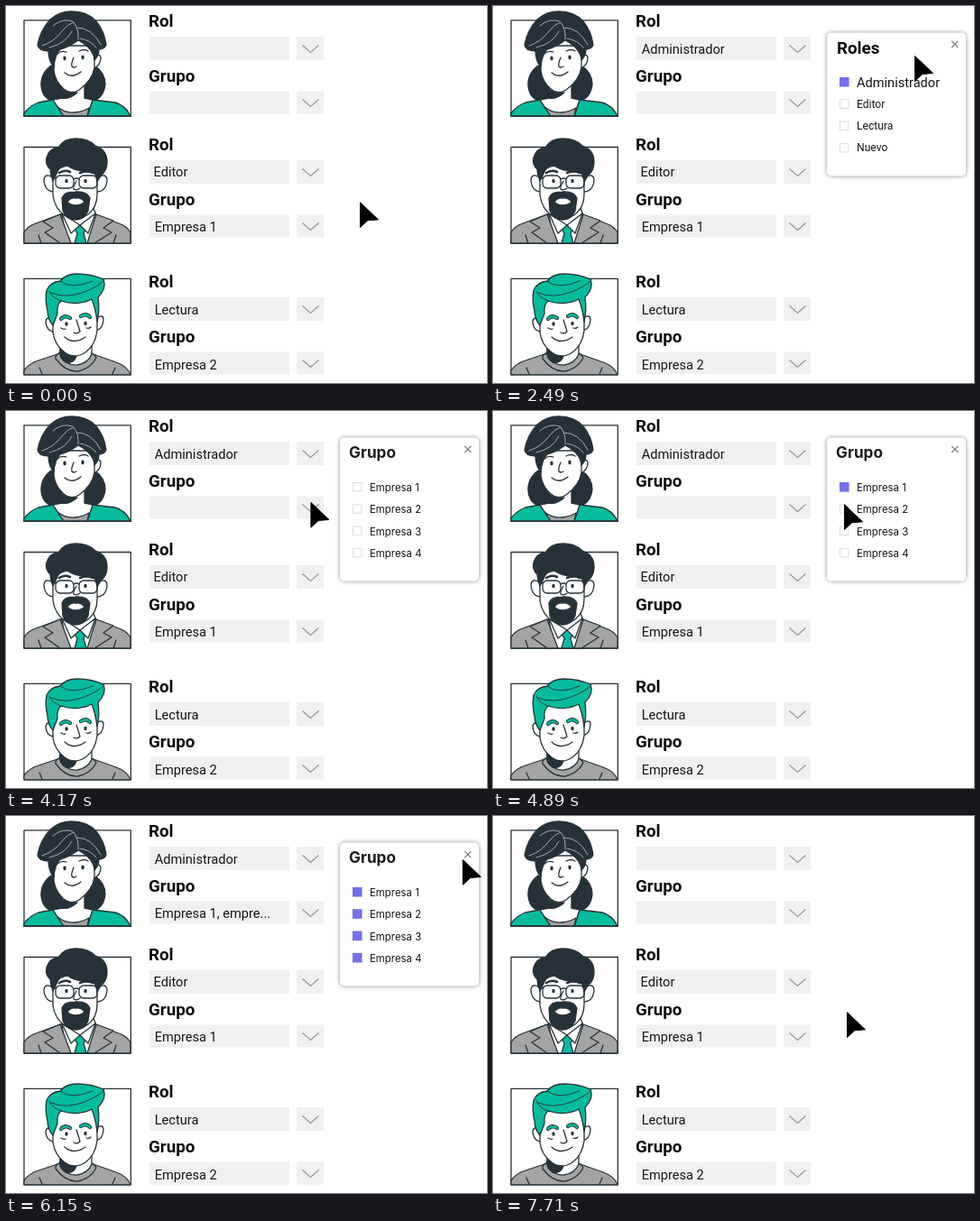
An HTML page for the animation above (8.19 s loop, 533x418 px).

```html
<!DOCTYPE html>
<html lang="es">
<head>
<meta charset="utf-8">
<title>Rol y grupo</title>
<style>
html, body { margin: 0; width: 100%; height: 100%; overflow: hidden; background: #fff; }
svg { display: block; }
text { font: 14.6px Roboto, sans-serif; fill: #151515; }
.b { font-size: 18.8px; font-weight: 700; fill: #0c0c0c; }
.s { font-size: 12.1px; }
.g { font: 11.4px Inter, sans-serif; }
.gb { font: 700 17.2px Inter, sans-serif; fill: #1c1c1c; }
.face { stroke: #263238; stroke-width: 1.3; stroke-linejoin: round; stroke-linecap: round; fill: #fff; }
.ink { fill: #263238; }
.teal { fill: #06bc9c; }
.grey { fill: #a4a4a4; }
.line { fill: none; }
.shine { fill: none; stroke: #c3cacd; stroke-width: .8; }
.dot { fill: #263238; stroke: none; }
.card { fill: #fff; filter: drop-shadow(0 0 2.5px rgba(0,0,0,.45)); }
</style>
</head>
<body>
<svg width="533" height="418" viewBox="0 0 533 418">
  <g class="face">
    <rect x="20" y="15.800" width="118.300" height="106.500"/>
    <path class="ink" d="M50 66Q38 75 39 89Q41 104 53 105Q60 105 62 98V70ZM98 66Q110 74 110 87Q108 102 97 105Q88 105 86 98V80Z"/>
    <path class="teal" d="M20 122V119Q27 110 36 107L52 104L64 122ZM138 122Q132 110 121 107L96 104L90 122Z"/>
    <path d="M62 88V102L52 104L64 122H90L96 104L87 102V88Z"/>
    <path class="grey" d="M57 112Q66 119 76 118Q86 117 92 113L90 122H64Z"/>
    <path class="ink" d="M62 92Q69 98 79 96Q70 104 62 102Z"/>
    <path d="M98 56Q104 52 105 57Q105 66 97 69"/>
    <path d="M53 44V72Q55 84 64 92Q72 99 81 93Q96 82 98 68V44Z"/>
    <path class="ink" d="M53 68Q47 60 47 50Q36 50 35 43Q38 27 49 15Q59 6 73 6Q90 6 100 17Q109 28 111 43Q109 48 103 48Q103 55 98 60Q97 47 80 38Q69 46 60 48Q54 54 53 68Z"/>
    <path class="shine" d="M40 44Q53 40 62 28Q68 20 75 18Q81 26 80 37M48 46Q66 42 73 28M79 24Q95 24 105 43M82 36Q94 38 100 46M52 22Q62 13 74 17"/>
    <path class="line" d="M57 53Q61 49 67 51M81 50Q87 47 91 50M75 57Q72 64 73 67Q75 69 78 67M65 74Q73 81 83 73"/>
    <ellipse class="dot" cx="65" cy="58" rx="1.7" ry="2.4"/><ellipse class="dot" cx="85" cy="57" rx="1.7" ry="2.4"/>
    <path class="line" d="M20 122.300H138"/>
  </g>

  <g class="face">
    <rect x="20" y="156.500" width="118.300" height="106.500"/>
    <path class="grey" d="M20 263V251Q24 244 33 241L60 231H99L125 241Q134 244 138 251V263Z"/>
    <path d="M62 222V232L68 263H95L100 232L96 222Z"/>
    <path class="grey" d="M60 231L41 239L52 246L43 251L60 263H72ZM100 231L119 238L108 246L117 251L98 263H90Z"/>
    <path class="teal" d="M75 246L82 243L89 246L86 252L89 263H76L79 252Z"/>
    <path d="M62 230L82 243L72 252ZM99 230L82 243L91 252Z"/>
    <path d="M53 191Q43 184 42 193Q43 206 54 206M101 191Q111 184 112 193Q111 206 100 206"/>
    <path d="M52 177V210Q54 225 66 233Q78 240 91 231Q101 223 101 209V177Z"/>
    <path class="ink" d="M52 194Q49 187 49 181Q43 176 45 168Q48 158 58 157Q64 147 77 147Q91 147 99 155Q112 159 112 173Q112 183 105 188L101 195Q100 186 95 183Q79 185 68 177Q58 178 56 186Z"/>
    <path class="ink" d="M62 213Q64 206 77 206Q90 205 93 213L91 227Q87 237 77 237Q67 237 63 227Z"/>
    <path d="M68 217Q72 212 77 213Q83 212 87 217Q84 221 77 221Q71 221 68 217Z"/>
    <path class="line" d="M59 185Q65 181 71 184M82 185Q90 182 96 185" stroke-width="2.6"/>
    <path class="line" d="M52 192L56 190M75 192Q78 190 81 192M100 190L103 191M78 194Q74 201 75 203Q78 205 82 202"/>
    <rect class="line" x="55" y="188" width="20" height="14" rx="5"/>
    <rect class="line" x="81" y="188" width="20" height="14" rx="5"/>
    <ellipse class="dot" cx="67" cy="194" rx="1.7" ry="2.2"/><ellipse class="dot" cx="88" cy="194" rx="1.7" ry="2.2"/>
    <path class="line" d="M36 254L39 263M122 254L119 263"/>
  </g>

  <g class="face">
    <rect x="20" y="302.300" width="118.300" height="106.500"/>
    <path class="grey" d="M20 408.800V404Q26 396 36 393L60 385H94L122 395Q134 399 138 408.800Z"/>
    <path d="M60 372V386Q66 399 79 398Q91 396 95 386V372Z"/>
    <path class="ink" d="M60 377Q67 387 78 388Q75 397 66 395Q60 391 60 386Z"/>
    <path class="line" d="M60 384Q54 387 55 391Q66 406 80 405Q94 402 100 390Q98 386 95 385"/>
    <path d="M53 348Q45 343 44 350Q45 361 54 361M100 346Q108 341 108 348Q107 359 99 360"/>
    <path d="M52 328V362Q54 376 65 384Q76 392 88 384Q99 376 101 360V324Z"/>
    <path class="teal" d="M52 354Q46 347 46 338Q43 326 45 315Q49 306 60 305Q66 297 79 297Q94 297 108 303Q112 313 102 323Q104 337 101 350Q99 335 95 325Q80 333 61 327Q56 331 57 341Z"/>
    <path class="line" d="M50 318Q66 325 87 317Q102 311 109 304M61 327Q50 323 48 316M60 305Q72 315 96 305" stroke-width=".9"/>
    <path class="line" d="M61 347Q65 342 71 346M83 344Q89 340 93 345" style="stroke:#263238;stroke-width:4.200"/>
    <path class="line" d="M61 347Q65 342 71 346M83 344Q89 340 93 345" style="stroke:#06bc9c;stroke-width:2.400"/>
    <path class="line" d="M78 348Q81 357 82 361Q79 364 75 362M65 367Q75 376 88 367M61 357Q64 359 66 358M89 357Q92 358 94 356"/>
    <ellipse class="dot" cx="67" cy="352.500" rx="1.7" ry="2.3"/><ellipse class="dot" cx="88" cy="352" rx="1.7" ry="2.3"/>
    <path class="line" d="M37 401L40 408M121 401L118 408"/>
  </g>

  <g id="form"></g>
  <text x="163.500" y="189">Editor</text>
  <text x="164.700" y="250">Empresa 1</text>
  <text x="164.700" y="342">Lectura</text>
  <text x="164.700" y="403">Empresa 2</text>
  <text id="role" x="164.700" y="53">Administrador</text>
  <text id="group" x="164.700" y="113">Empresa 1, empre...</text>
  <g id="roles"></g>
  <g id="groups"></g>
  <path id="cursor" d="M.5 .8V28.500L8.800 20.800L20.500 19.800Z" stroke="#000" stroke-linejoin="round"/>
</svg>
<script>
const LOOP = 8190, STEP = 30;
const $ = id => document.getElementById(id);

const field = (label, base, y, h) => `<text class="b" x="158" y="${base}">${label}</text>
  <path fill="#f0f0f0" d="M159 ${y}h155v${h}h-155zM322 ${y}h30v${h}h-30z"/>
  <path fill="none" stroke="#999" stroke-width="1.3" d="M328.500 ${y + h / 2 - 3.5}l9 8l9 -8"/>`;
$('form').innerHTML = [0, 137, 289].map(y =>
  field('Rol', y + 23, y + 34, 26) + field('Grupo', y + 84, y + 94.5, 25)).join('');

// rows: [text, class, baseline]
const popup = (id, title, cls, x, base, rows) => {
  $(id).innerHTML = `<rect class="card" x="370" y="29.500" width="154" height="159" rx="5"/>
    <text class="${cls}" x="${x}" y="${base}">${title}</text>
    <path stroke="#777" stroke-width="1.1" d="M508.200 39l7 7m0 -7l-7 7"/>` +
    rows.map(([text, c, y], i) => {
      const top = 79.5 + i * 24.3;
      return `<rect x="384.500" y="${top}" width="9.500" height="9.500" fill="#fff" stroke="#ddd"/>
        <rect class="tick" x="384" y="${top - .5}" width="10.500" height="10.500" fill="#756fec"/>
        <text class="${c}" x="403" y="${y}">${text}</text>`;
    }).join('');
  return [...$(id).querySelectorAll('.tick')];
};
const roleTicks = popup('roles', 'Roles', 'b', 381, 53,
  [['Administrador', '', 90], ['Editor', 's', 112.7], ['Lectura', 's', 136.8], ['Nuevo', 's', 161.2]]);
const groupTicks = popup('groups', 'Grupo', 'gb', 380, 52.3,
  [1, 2, 3, 4].map(n => ['Empresa ' + n, 'g', 64.9 + n * 24.2]));

// cursor moves: [start, end, x, y]
const moves = [
  [270, 660, 336, 45], [1170, 1410, 392, 84], [2280, 2610, 510, 38],
  [3060, 3390, 331, 103], [4140, 4410, 389, 82], [4680, 4920, 389, 106],
  [5100, 5220, 389, 130], [5340, 5460, 389, 154.5], [5670, 5820, 426, 122],
  [5820, 6180, 513, 41], [6900, 7230, 392, 217]
];
const groupTickTimes = [[4440, 4650], [4980, 5130], [5220, 5370], [5460, 5640]];

const ramp = (t, a, b) => Math.min(1, Math.max(0, (t - a) / (b - a)));
const fade = (el, v) => el.setAttribute('opacity', v);

function draw(t) {
  let x = 392, y = 217;
  for (const [a, b, toX, toY] of moves) {
    const k = ramp(t, a, b);
    x += (toX - x) * k;
    y += (toY - y) * k;
  }
  $('cursor').setAttribute('transform', `translate(${x} ${y})`);

  const clear = ramp(t, 7500, 7710);
  fade($('roles'), ramp(t, 750, 960) - ramp(t, 2550, 2760));
  fade($('groups'), ramp(t, 3600, 3810) - ramp(t, 6690, 6900));
  fade($('role'), ramp(t, 1710, 1920) - clear);
  fade($('group'), ramp(t, 5010, 5220) - clear);
  roleTicks.forEach((el, i) => fade(el, i ? 0 : ramp(t, 1650, 1860)));
  groupTicks.forEach((el, i) => fade(el, ramp(t, ...groupTickTimes[i])));
}

function tick() {
  const t = performance.now() % LOOP;
  draw(Math.floor(t / STEP) * STEP);
  requestAnimationFrame(tick);
}
tick();
</script>
</body>
</html>
```
